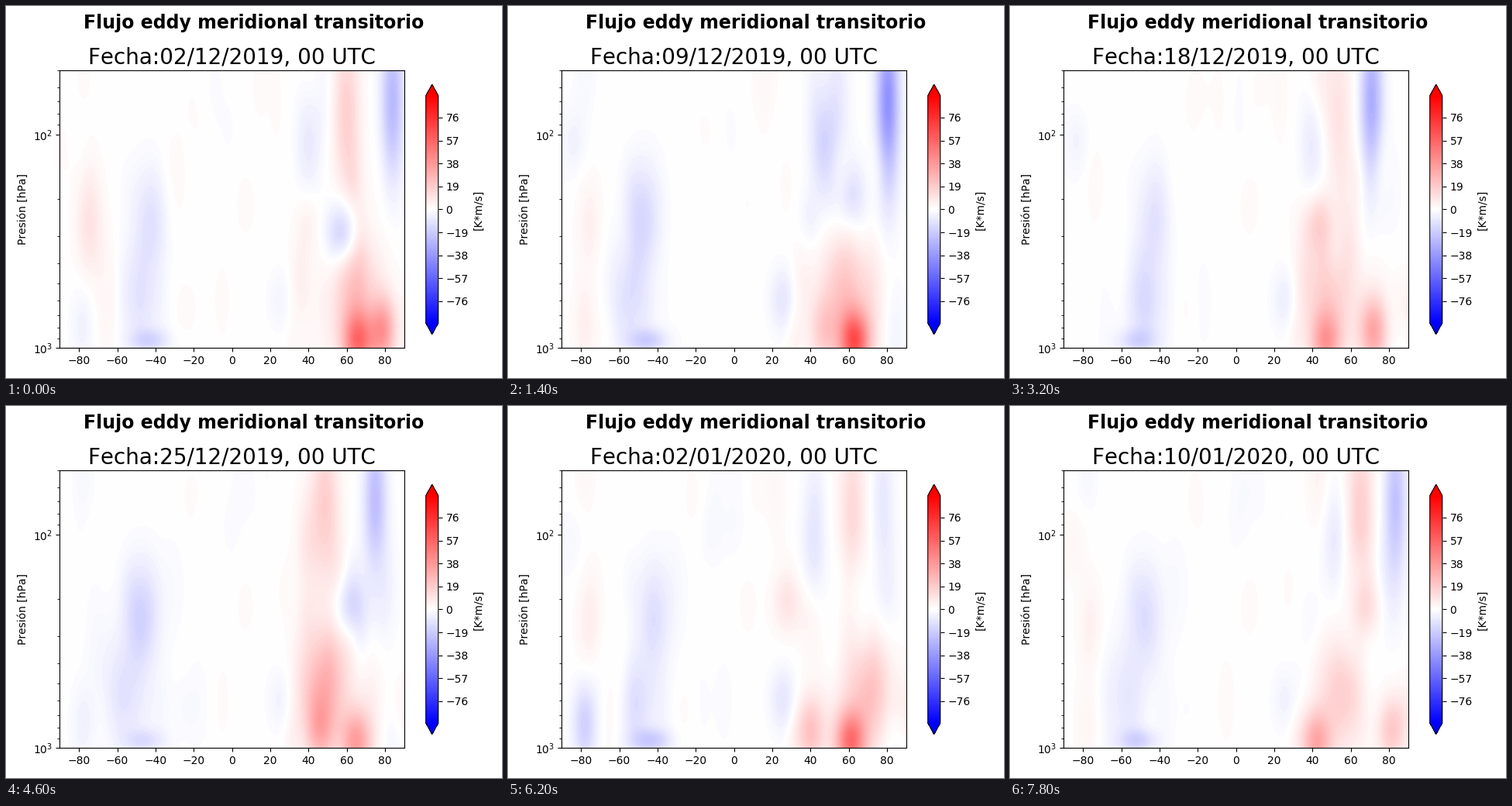
A matplotlib script that plays this animation: 640x480 px, repeating every 8000 ms.

```python
import numpy as np
import matplotlib.pyplot as plt
from matplotlib.animation import FuncAnimation

W, H, DPI = 640, 480, 100
DAYS, STEP_MS = 40, 200
LIMIT = 94
KEY_DAYS = [0, 7, 11, 16, 23, 31, 39]

lat = np.linspace(-90, 90, 445)
logp = np.linspace(np.log10(50), 3, 358)


def path(day, *points):
    """Ease through one value per key day."""
    k = min(np.searchsorted(KEY_DAYS, day, side="right"), len(KEY_DAYS) - 1)
    u = (day - KEY_DAYS[k - 1]) / (KEY_DAYS[k] - KEY_DAYS[k - 1])
    ease = u * u * (3 - 2 * u)
    return points[k - 1] + (points[k] - points[k - 1]) * ease


def wave(day, mean, swing, period, phase=0):
    return mean + swing * np.sin(2 * np.pi * day / period + phase)


def cell(x, hpa, sx, sy, peak):
    """Gaussian patch: sx in degrees of latitude, sy in decades of pressure."""
    gx = np.exp(-.5 * ((lat - x) / sx) ** 2)
    gy = np.exp(-.5 * ((logp - np.log10(hpa)) / sy) ** 2)
    return peak * np.outer(gy, gx)


def stratosphere(day):
    vortex = cell(path(day, 84, 80.5, 72.5, 71, 75, 78, 83.5), 70, 4.2, .26,
                  path(day, -26, -40, -44, -30, -24, -8, -22))
    jet = cell(path(day, 60, 53, 51, 54, 50, 62, 65), 80, 5, .28,
               path(day, 17, -10, -8, 10, 14, 14, 18))
    flank = cell(path(day, 40, 46, 48, 40, 40, 42, 52), 110, 4.5, .18,
                 path(day, -8, -13, 8, -8, 9, -9, -8))
    return vortex + jet + flank


def northern_track(day):
    bend = cell(path(day, 58, 61, 53, 42, 61, 28, 68),
                path(day, 290, 200, 285, 260, 220, 210, 220), 5.5, .1,
                path(day, -20, -10, -15, 18, -15, 9, 12))
    middle = cell(path(day, 66, 58, 60, 48, 47, 71, 55), 520, 8, .18,
                  path(day, 20, 17, 8, 15, 24, 19, 14))
    surface = cell(path(day, 66, 63, 81, 47, 65, 61, 42), 940, 5.5, .1,
                   path(day, 46, 58, 22, 32, 32, 48, 30))
    second = cell(path(day, 79, 47, 70, 72, 46, 40, 82), 840, 5, .11,
                  path(day, 36, 15, 12, 30, 20, 21, 22))
    haze = cell(60, 650, 16, .22, 5)
    gap = cell(26, 600, 5, .11, wave(day, -7, 3, 12, 1))
    return bend + middle + surface + second + haze + gap


def southern_track(day):
    """Column leaning poleward toward the ground, with a shallow foot."""
    top = cell(wave(day, -45, 3, 15, 1.5), 250, 6, .18, wave(day, -12, 3, 13))
    stem = cell(wave(day, -53, 4, 17, 1.5), 600, 6.5, .18,
                wave(day, -11, 3, 19, 1))
    foot = cell(wave(day, -47, 5, 26, 1), 930, 7, .04, wave(day, -13, 4, 11))
    polar = cell(-78, 780, 4.5, .14, path(day, -5, 6, 15, 0, -5, -17, 4))
    edge = cell(-75, 270, 5, .17, wave(day, 3.5, 5, 33, 1.2))
    return top + stem + foot + polar + edge


def eddies(day, count=44):
    """Weak patches that come and go, stronger in the north."""
    rng = np.random.default_rng(12)
    total = 0
    for x in np.linspace(-86, 88, count):
        hpa = 10 ** rng.uniform(1.75, 2.95)
        sx, sy = rng.uniform(3, 5), rng.uniform(.1, .2)
        size = 1.8 + 2.2 * (x > 30) + (abs(x) > 35)
        total = total + cell(x, hpa, sx, sy, wave(
            day, 0, size, rng.uniform(4, 9), rng.uniform(0, 2 * np.pi)))
    return total


def flux(day):
    field = (stratosphere(day) + northern_track(day)
             + southern_track(day) + eddies(day))
    return np.floor(field) + .5


def date_text(day):
    d = day + 2
    date = f"{d:02d}/12/2019" if d <= 31 else f"{d - 31:02d}/01/2020"
    return f"Fecha:{date}, 00 UTC"


def box(left, right, top, bottom):
    return [left / W, 1 - bottom / H, (right - left) / W, (bottom - top) / H]


plt.rcParams.update({"font.family": "DejaVu Sans", "text.kerning_factor": 6})
fig = plt.figure(figsize=(W / DPI, H / DPI), dpi=DPI)
fig.suptitle("Flujo eddy meridional transitorio", fontsize=17, fontweight="bold")

ax = fig.add_axes(box(69.45, 513.95, 83.2, 441.3))
ax.set_yscale("log")
ax.set_xlim(-90, 90)
ax.set_ylim(1000, 50)
ax.set_xticks(range(-80, 81, 20))
ax.set_ylabel("Presión [hPa]")
title = ax.set_title(date_text(0), fontsize=20)
image = ax.imshow(flux(0), cmap="bwr", vmin=-LIMIT, vmax=LIMIT, aspect="auto",
                  extent=(0, 1, 0, 1), transform=ax.transAxes,
                  interpolation="nearest")

cax = fig.add_axes(box(541.7, 557.8, 101.25, 423.55))
bar = fig.colorbar(image, cax=cax, extend="both", ticks=range(-76, 77, 19))
bar.set_label("[K*m/s]")


def update(day):
    image.set_data(flux(day))
    title.set_text(date_text(day))
    return image, title


anim = FuncAnimation(fig, update, frames=DAYS, interval=STEP_MS, repeat=True)
plt.show()
```
